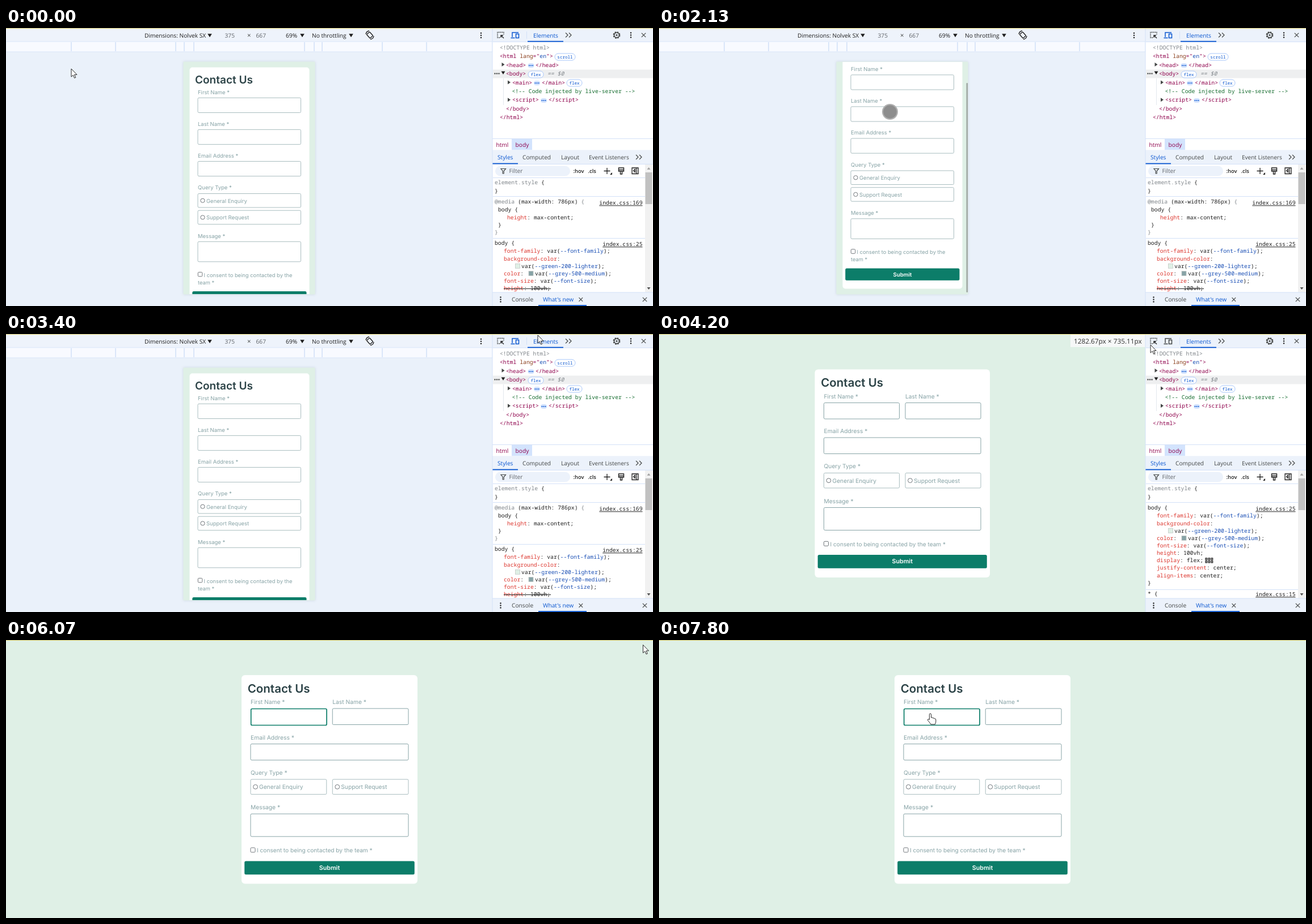
These frames come from a looping animation (1140 px wide and 491 px high, 8 s). An HTML page:

```html
<!DOCTYPE html>
<html lang="en">
<head>
<meta charset="utf-8">
<title>Contact form in device mode</title>
<style>
  html, body { margin: 0; width: 100%; height: 100%; overflow: hidden; }
  svg { display: block; width: 100vw; height: 100vh; }
  text { white-space: pre; text-rendering: geometricPrecision; }
  .form { font-family: Inter, sans-serif; }
  .ui { font-family: "Open Sans", "Noto Sans", sans-serif; }
  .mono { font-family: "Noto Sans Mono", "DejaVu Sans Mono", monospace; }
</style>
</head>
<body>
<svg id="stage" viewBox="0 0 1140 491" xmlns="http://www.w3.org/2000/svg"></svg>
<script>
const MINT = '#dff0e6', GREEN = '#0c7d69', GREY = '#87a3a6', INK = '#2b4246';
const BAR = '#ecf2fb', LINE = '#d3e1f8', BLUE = '#0b57d0', DARK = '#1f1f1f', ICON = '#444746';
const TOKEN = { p: '#8e004b', a: '#8a3f1c', b: '#1a4fb5', k: DARK, g: '#146c2e', r: '#dc362e', y: '#80868b' };

// Drawing helpers, all returning markup
const rect = (x, y, w, h, fill, more = '') =>
  `<rect x="${x}" y="${y}" width="${w}" height="${h}" fill="${fill}" ${more}/>`;
const stroke = (d, color = ICON, width = 1.2, more = '') =>
  `<path d="${d}" fill="none" stroke="${color}" stroke-width="${width}" ${more}/>`;
const fill = (d, color = ICON) => `<path d="${d}" fill="${color}"/>`;
const text = (cls, x, y, s, size, color, more = '') =>
  `<text class="${cls}" x="${x}" y="${y}" font-size="${size}" fill="${color}" ${more}>${s}</text>`;
const ui = (x, y, s, color = DARK, size = 10.2, more = '') => text('ui', x, y, s, size, color, more);
const group = (id, ...parts) => `<g id="${id}">${parts.join('')}</g>`;
// Each part of a code line starts with its colour key
const mono = (x, y, ...parts) => text('mono', x, y + 3.4,
  parts.map(p => `<tspan fill="${TOKEN[p[0]]}">${p.slice(1)}</tspan>`).join(''), 9.78, DARK);
const cross = (x, y, r = 3.7) => stroke(`M${x - r} ${y - r}l${2 * r} ${2 * r}m0 ${-2 * r}l${-2 * r} ${2 * r}`);
const dots = (x, y) => [-4, 0, 4].map(d => `<circle cx="${x}" cy="${y + d}" r="1.2" fill="${DARK}"/>`).join('');
const down = (x, y, r = 3.8) => fill(`M${x - r} ${y - r * .75}h${2 * r}l${-r} ${r * 1.6}z`, DARK);
const right = (x, y) => fill(`M${x - 2} ${y - 3.5}v7l5-3.5z`, ICON);
const chevrons = (x, y) => stroke(`M${x - 5} ${y - 4}l4 4-4 4m6-8l4 4-4 4`);

// Form pieces
const label = (x, y, s, size, more) => text('form', x, y, s, size, GREY, more);
const field = (x, y, w, h, color = '#a9bdbf', width = 1) =>
  rect(x, y, w, h, '#fff', `rx="2" stroke="${color}" stroke-width="${width}"`);
const radio = (x, y, w, h, s, size) => field(x, y, w, h) +
  `<circle cx="${x + 8.5}" cy="${y + h / 2}" r="${size * .38}" fill="#fff" stroke="#70757a"/>` +
  label(x + 15, y + h / 2 + 4, s, size);
const check = (x, y, size) => rect(x, y, size, size, '#fff', 'rx="1.5" stroke="#70757a"');
const submit = (x, y, w, h, size) => rect(x, y, w, h, GREEN, 'rx="2.5"') +
  text('form', x + w / 2, y + h / 2 + 3.6, 'Submit', size, '#fff', 'text-anchor="middle" font-weight="600"');
const heading = (x, y, size) => text('form', x, y, 'Contact Us', size, INK, 'font-weight="600"');

function phoneForm() {
  const textFields = ['First Name *', 'Last Name *', 'Email Address *'].map((name, i) =>
    label(338, 116.6 + i * 56.1, name, 9.5) + field(338, 123.3 + i * 56.1, 181.5, 26.2)).join('');
  return rect(323.5, 69.5, 211, 431.5, '#fff', 'rx="5"') + heading(333, 98, 19) + textFields +
    label(338, 285.4, 'Query Type *', 9.5) +
    radio(338, 292.5, 181.5, 24.5, 'General Enquiry', 9.5) +
    radio(338, 322.2, 181.5, 24.5, 'Support Request', 9.5) +
    label(338, 370.8, 'Message *', 9.5) + field(338, 377.3, 181.5, 35.5) +
    check(338.3, 431.3, 7.5) + label(348.5, 439.6, 'I consent to being contacted by the', 9.35) +
    label(338, 452.8, 'team *', 9.35) + submit(328.3, 465, 201.2, 21.2, 9.7);
}

function deskForm(x, w, focused) {
  const up = focused ? -.5 : 0, low = focused ? .6 : 0;
  const left = x + 16, full = w - 32, half = (w - 42.5) / 2, second = left + full - half;
  return rect(x, 62.5 + up, w, 367.5 + low - up, '#fff', 'rx="6"') + heading(x + 10.7, 93.3 + up, 20.5) +
    label(left, 113.7 + up, 'First Name *', 10.25) + label(second, 113.7 + up, 'Last Name *', 10.25) +
    (focused ? field(left + .7, 121.5, half - .4, 29, GREEN, 1.7) : field(left, 121.5, half, 28.5, GREY)) +
    field(second, 121.5 + up, half, 28.5, GREY) +
    label(left, 175 + low, 'Email Address *', 10.25) + field(left, 183 + low, full, 28.5, GREY) +
    label(left, 237 + low, 'Query Type *', 10.25) +
    radio(left, 245.5 + low, half, 26.5, 'General Enquiry', 10.25) +
    radio(second, 245.5 + low, half, 26.5, 'Support Request', 10.25) +
    label(left, 298.8 + low, 'Message *', 10.25) + field(left, 306.5 + low, full, 40, GREY) +
    check(left, 366.3 + low, 8) + label(left + 11, 374.6 + low, 'I consent to being contacted by the team *', 10.15) +
    submit(x + 5.2, 390 + low, w - 10.4, 23.7, 10.7);
}

function deviceMode() {
  const marks = [115, 193, 299, 314, 331, 526, 543, 557, 663, 741];
  return rect(0, 1, 857, 490, '#eaf1fa') + rect(0, 1, 857, 23, '#eef3fb') +
    rect(0, 24, 857, 18, '#f8faff', `stroke="${LINE}" stroke-width=".8"`) +
    marks.map(x => rect(x - .8, 25, 1.6, 16, LINE)).join('') +
    ui(244, 16.5, 'Dimensions: Nolvek SX') + down(359, 13) +
    ui(385.5, 16.5, '375', '#5f6368') + ui(425, 17, '×', ICON, 11.5) + ui(440.5, 16.5, '667', '#5f6368') +
    ui(493, 16.5, '69%') + down(522, 13) + ui(539, 16.5, 'No throttling') + down(608, 13) + dots(837, 13) +
    rect(637.5, 8, 7, 9, 'none', `rx="1" stroke="${DARK}" stroke-width="1.4" transform="rotate(-42 641 12.5)"`) +
    stroke('M634 11a7 7 0 0 1 6-6m8 9a7 7 0 0 1-6 6', DARK, 1.3) +
    rect(312.5, 59.5, 232, 411, MINT, 'filter="url(#glow)"') +
    `<g clip-path="url(#screen)">${rect(313, 60, 231, 410, MINT)}${group('page', phoneForm())}</g>` +
    rect(541.5, 63, 2.6, 370, '#a0a8a4', 'id="thumb" rx="1.3"') +
    rect(313, 60, 231, 410, 'rgba(111,168,220,.66)', 'id="tint"');
}

const badge = (x, y, w, s) => rect(x, y - 6, w, 12, '#fff', 'rx="6" stroke="#a8c7fa"') +
  text('mono', x + w / 2, y + 2.6, s, 7.6, BLUE, 'text-anchor="middle"');
const fold = (x, y) => rect(x - 5.5, y - 4, 11, 8, '#d3e3fd', 'rx="4"') +
  [-3, 0, 3].map(d => `<circle cx="${x + d}" cy="${y}" r="1" fill="${BLUE}"/>`).join('');
const tag = (name, closing = '') => `p&lt;${closing}${name}&gt;`;

function elementTree() {
  return rect(858, 73.5, 282, 15, '#eeeff0') +
    group('rowHead', rect(858, 58.5, 282, 15, '#f3f3f4')) + group('rowHtml', rect(858, 43, 282, 15, '#f3f3f4')) +
    mono(870, 35, 'y&lt;!DOCTYPE html&gt;') +
    mono(870, 50, 'p&lt;html ', 'alang', 'p="', 'ben', 'p"&gt;') + group('scrollBadge', badge(967, 51, 36, 'scroll')) +
    right(875.5, 64.5) + mono(881, 65.3, tag('head')) + fold(925, 66.3) + mono(933, 65.3, tag('head', '/')) +
    [861.5, 865, 868.5].map(x => `<circle cx="${x}" cy="80.5" r="1.2" fill="${ICON}"/>`).join('') +
    down(876, 79, 3.4) + mono(881, 81, tag('body')) + badge(920, 82, 27, 'flex') +
    text('mono', 954, 84.4, '== $0', 9.78, '#80868b', 'font-style="italic"') +
    stroke('M876.5 89V136', '#e3e8ee', 1) +
    right(886, 96) + mono(892, 96.3, tag('main')) + fold(935.5, 97.3) + mono(944, 96.3, tag('main', '/')) + badge(988, 97, 27, 'flex') +
    mono(891.5, 111.7, 'g&lt;!-- Code injected by live-server --&gt;') +
    right(886, 126.7) + mono(892, 127, tag('script')) + fold(947.5, 128) + mono(956, 127, tag('script', '/')) +
    mono(881, 142.3, tag('body', '/')) + mono(870, 158, tag('html', '/')) +
    group('commentButton', rect(1121.5, 57.5, 17, 16, '#fff', 'rx="4" stroke="#d5dae0"') +
      stroke('M1129 61h-3.5v8.5h8.5v-3.5M1132 60v5m-2.5-2.5h5', DARK, 1.2));
}

const link = (y, line) => text('mono', 1121.5, y + 4.8, `index.css:${line}`, 9.78, DARK, 'text-anchor="end" text-decoration="underline"');
const swatch = (x, y, color) => rect(x, y - 4, 8, 8, color, 'stroke="#c4c7c5" stroke-width=".8"');
const rule = y => rect(858, y, 268, 1, LINE);

function bodyRule(y, struck) {
  const row = i => y + 14 + i * 13.15;
  const prop = (i, name, ...value) => mono(877, row(i), 'r' + name, 'k: ', ...value);
  return mono(861, y, 'kbody {') + link(y - 2.5 + 3, 25) +
    prop(0, 'font-family', 'kvar(', 'b--font-family', 'k);') + prop(1, 'background-color') +
    swatch(897.5, row(2), MINT) + mono(908, row(2), 'kvar(', 'b--green-200-lighter', 'k);') +
    prop(3, 'color') + swatch(921, row(3), GREY) + mono(932, row(3), 'kvar(', 'b--grey-500-medium', 'k);') +
    prop(4, 'font-size', 'kvar(', 'b--font-size', 'k);') + prop(5, 'height', 'k100vh;') +
    (struck ? rect(877, row(5) + .2, 83, 1, DARK) : '') +
    prop(6, 'display', 'kflex;') +
    [0, 5, 10].map(d => stroke(`M${963 + d} ${row(6) - 4}h2.6v3h-2.6zm0 5h2.6v3h-2.6z`, DARK, 1.3)).join('') +
    prop(7, 'justify-content', 'kcenter;') + prop(8, 'align-items', 'kcenter;') + mono(861, row(9), 'k}');
}

function devtools() {
  return rect(857, 1, 283, 490, '#fff') + rect(857, 1, 283, 23.5, BAR) + rule(24).replace('268', '282') +
    stroke('M870 17h-4V7.500h11v4', ICON, 1.3, 'stroke-dasharray="2 1"') + stroke('M877 18l-5-5m0 4v-4h4', DARK, 1.4) +
    `<g id="deviceIcon" stroke="${BLUE}">` +
      '<path d="M892 16V8h11M889.500 17.500h7M898.500 10.500h5v7h-5z" fill="none" stroke-width="1.5"/></g>' +
    rect(917, 6, 1, 13, LINE) + ui(929, 16.5, 'Elements', BLUE) + rect(919, 22.8, 63, 1.8, BLUE) + chevrons(991, 12.5) +
    `<circle cx="1076" cy="12.500" r="5.200" fill="none" stroke="${ICON}" stroke-width="2.400" stroke-dasharray="2.700 1.380"/>` +
    `<circle cx="1076" cy="12.500" r="4.200" fill="${BAR}" stroke="${ICON}" stroke-width="1.200"/>` +
    `<circle cx="1076" cy="12.500" r="1.600" fill="${ICON}"/>` + dots(1101, 12.5) + cross(1123.5, 12.5) +
    elementTree() +
    rect(857, 195, 283, 1, LINE) + rect(891, 196, 36, 19.5, '#d3e3fd') +
    ui(863.5, 209.5, 'html', TOKEN.p) + ui(897.5, 209.5, 'body', TOKEN.p) +
    rect(857, 215.5, 283, 24.5, BAR) + ui(866, 232, 'Styles', BLUE) + ui(910, 232, 'Computed', ICON) +
    ui(978, 232, 'Layout', ICON) + ui(1027, 232, 'Event Listeners', ICON, 10) + chevrons(1115, 228) +
    rect(857, 240, 283, 1, LINE) + rect(857, 238.6, 45, 1.8, BLUE) +
    rect(862, 243.5, 132, 18, BAR, 'rx="9"') + stroke('M872 248.500h8.500l-3.300 4v4.500h-2v-4.500z') +
    ui(886.5, 256.3, 'Filter', '#5f6368') + ui(999.5, 256, ':hov', DARK, 9.3, 'font-weight="600"') +
    ui(1025.5, 256, '.cls', DARK, 9.3, 'font-weight="600"') +
    stroke('M1059 247v11M1053.500 252.500h11', DARK, 1.3) + fill('M1068 255v4h-4z', DARK) +
    stroke('M1079.500 247h9v6h-9zM1079.500 250.500h9M1082.500 253v5h3v-5', DARK, 1.4) +
    stroke('M1103 247h11v10.500h-11zM1111 247v10.500M1108.500 249.500v5l-3-2.500z', DARK, 1.3) + rule(264) +
    `<g clip-path="url(#styles)">${mono(861, 273, 'yelement.style', 'k {')}${mono(861, 288, 'k}')}${rule(297)}` +
      group('phoneStyles', mono(861, 307, 'y@media ', 'k(max-width: 786px) ', 'y{'), link(307.5, 169),
        mono(867, 320.3, 'kbody {'), mono(883, 334.5, 'rheight', 'k: max-content;'), mono(867, 348, 'k}'),
        mono(861, 361, 'y}'), rule(371), bodyRule(380, true)) +
      group('deskStyles', bodyRule(307, false), rule(451), mono(861, 459, 'k* {'), link(458.5, 15)) + '</g>' +
    rect(1126, 241, 13, 226, '#f1f1f1') + rect(1126.5, 255, 12, 56, '#c1c1c1') +
    fill('M1129.500 250h6l-3-4z', '#a3a3a3') + fill('M1129.500 458h6l-3 4z', '#505050') +
    rect(857, 467, 283, 24, BAR) + rect(857, 466.5, 283, 1, LINE) + dots(871.5, 479.5) +
    ui(891, 483.3, 'Console', ICON) + ui(946, 483.3, 'What\'s new', BLUE) + cross(1012.8, 479.5, 3.3) +
    rect(938, 489.2, 85, 1.8, BLUE) + cross(1125.5, 479.5) + rect(856.5, 1, 1, 490, LINE);
}

const pointer = (id, d) => `<path id="${id}" d="${d}" fill="#fff" stroke="#111" stroke-width=".9" stroke-linejoin="round"/>`;

document.getElementById('stage').innerHTML = `<defs>
  <clipPath id="screen"><rect x="313" y="60" width="231" height="410"/></clipPath>
  <clipPath id="styles"><rect x="857" y="265" width="269" height="202"/></clipPath>
  <filter id="glow"><feDropShadow dx="0" dy="0" stdDeviation="2" flood-color="#7d8fa5" flood-opacity=".3"/></filter></defs>` +
  rect(0, 0, 1140, 491, MINT) +
  group('device', deviceMode()) +
  group('narrow', deskForm(274.5, 308.5, false)) +
  group('wide', deskForm(415, 310, true), rect(441, 130, 1.7, 11, '#000', 'id="caret"')) +
  group('size', rect(725, 1, 132, 22, '#f6f8f8'), ui(731, 16.7, '1282.67px × 735.11px', '#303030', 11.8)) +
  group('tools', devtools()) + rect(0, 0, 1140, 1, '#d9cb6a') +
  group('cursor',
    pointer('arrow', 'M0 0V14.200L3.300 11.200 5.600 16.400 7.800 15.400 5.500 10.400H10Z'),
    pointer('hand', 'M-1.600 9V.6a1.600 1.600 0 0 1 3.200 0V6q2.800-.6 3.100 1 2.500-.6 2.900 1 2.200-.2 2.200 1.800v3.400q0 2.400-1.500 4.800H1Q-1.600 14-4.800 10.400-4.800 7.800-1.600 9.600Z'),
    '<g id="touch"><circle r="14" fill="#b0b0b0"/><circle r="11.800" fill="#8d8d8d"/></g>');

// Motion, counted in ticks of 1/15 s
const TICKS = 120;
const linear = p => p, easeIn = p => p * p, easeOut = p => p * (2 - p), smooth = p => p * p * (3 - 2 * p);
const path = [
  [1, 115, 72], [9, 418, 241, smooth], [12, 418, 241], [17, 404, 134, smooth], [20, 407, 148, smooth],
  [42, 407, 148], [48, 954, 52, easeIn], [51, 937, 2, linear], [55, 892, 3, easeOut], [59, 898, 9, smooth],
  [61, 898, 9], [73, 467, 145, smooth], [75, 472, 135, easeIn], [86, 1127, 9, smooth], [89, 1125, 8, linear],
  [90, 1125, 8], [95, 1061, 24, easeIn], [103, 488, 104, easeOut], [109, 478, 131, smooth], [TICKS, 478, 131],
];
const progress = (n, from, to) => Math.min(1, Math.max(0, (n - from) / (to - from)));

function cursorAt(n) {
  const i = Math.max(1, path.findIndex(key => key[0] >= n));
  const [t0, x0, y0] = path[i - 1], [t1, x1, y1, ease = linear] = path[i];
  const p = ease(progress(n, t0, t1));
  return [x0 + (x1 - x0) * p, y0 + (y1 - y0) * p];
}

const node = id => document.getElementById(id);
const show = (id, on) => { node(id).style.display = on ? '' : 'none'; };

function draw(n) {
  const isDevice = n < 61, hasTools = n < 91;
  const scroll = smooth(progress(n, 24, 27)) - smooth(progress(n, 32, 38));
  node('page').setAttribute('transform', `translate(0 ${-40.5 * scroll})`);
  node('thumb').setAttribute('y', 63 + 34 * scroll);
  node('thumb').setAttribute('opacity', n < 25 ? 0 : 1 - progress(n, 42, 45));
  node('deviceIcon').setAttribute('stroke', isDevice ? BLUE : ICON);

  show('device', isDevice);
  show('narrow', !isDevice && hasTools);
  show('wide', !hasTools);
  show('tools', hasTools);
  show('size', n >= 61 && n < 78);
  show('phoneStyles', isDevice);
  show('deskStyles', !isDevice);
  show('scrollBadge', isDevice);
  show('rowHead', n === 48);
  show('rowHtml', n === 49);
  show('tint', n === 49);
  show('commentButton', n === 48 || n === 49);
  show('caret', Math.floor((n / 15 + .2) * 2) % 2 === 1);

  const [x, y] = cursorAt(n);
  const left = hasTools ? 290 : 431;
  const touch = isDevice && x > 313 && x < 544 && y > 60 && y < 470;
  const hand = !isDevice && x > left && x < left + 278 && y > 121 && y < 151;
  show('touch', touch);
  show('hand', hand);
  show('arrow', !touch && !hand);
  node('cursor').setAttribute('transform', `translate(${x} ${y})`);
}

const start = performance.now();
function loop() {
  const ms = (performance.now() - start) % 8000;
  draw(Math.floor(ms * 15 / 1000 + .1) % TICKS);
  requestAnimationFrame(loop);
}
loop();
</script>
</body>
</html>
```
